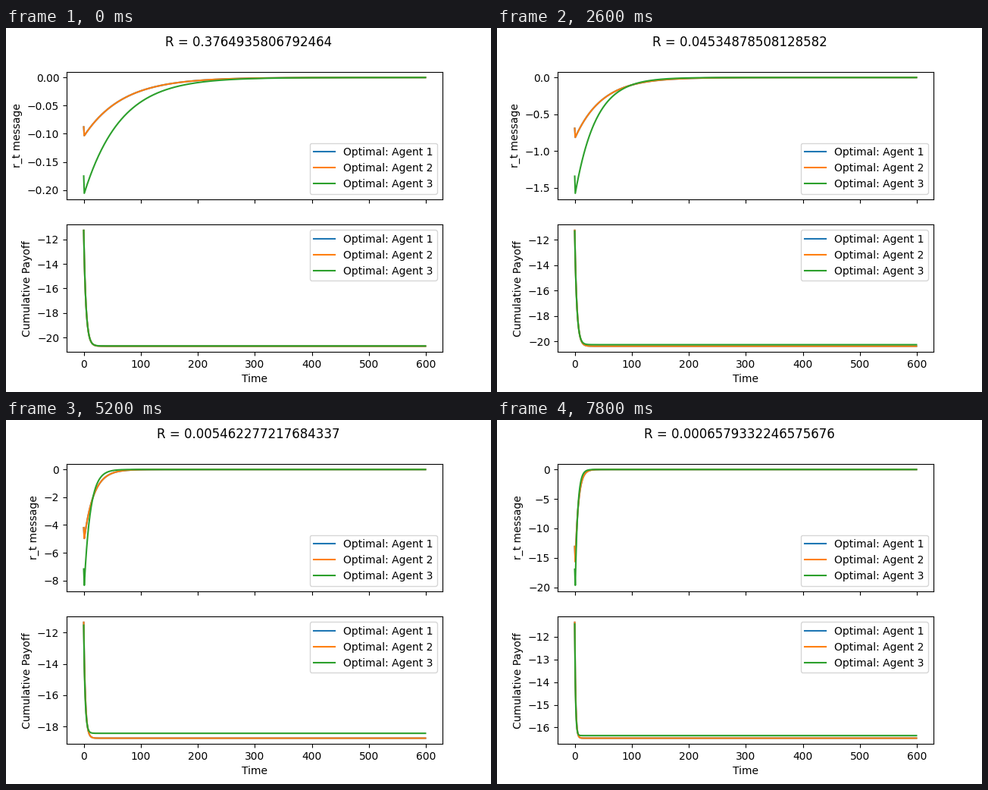
A matplotlib script for the animation above (8 s loop, 640 by 480 pixels).

```python
import numpy as np
import matplotlib.pyplot as plt
from matplotlib.animation import FuncAnimation

FRAMES, STEPS = 40, 600
COSTS = np.logspace(-7, 0, 100)[::-1][6:6 + FRAMES]

DELTA = 0.8        # discount factor
DECAY = 0.9862     # passive decay of the slow mode
PULL = 0.0137      # total influence of a group's messages
SPREAD = 0.0012    # cost of messages disturbing the consensus
START = 11.25      # state cost at time 0
MODE = 1.610       # slow mode after the first mixing step
ALIGN = 0.275      # how far the first message meets the slow mode
REST = 0.215       # leftover disagreement after the first step


def simulate(cost, size):
    """Messages and cumulative payoff of one agent in a group of equals."""
    pull, spread = PULL / size, SPREAD / size**2

    value = 4.5
    for _ in range(200):
        denom = cost + size * DELTA * (pull**2 * value + spread)
        gain = DELTA * DECAY * pull * value / denom
        left = DECAY - size * pull * gain
        value = 1 + cost * gain**2 + DELTA * (
            value * left**2 + spread * (size * gain)**2)

    first = -DELTA * pull * (value - 1 + ALIGN) * MODE / denom
    mode = (MODE + size * pull * first) * left ** np.arange(STEPS - 1)
    msg = np.concatenate([[first], -gain * mode])

    state = np.empty(STEPS)
    state[0] = START
    state[1:] = mode**2 + spread * (size * msg[:-1])**2
    state[1] += REST + 2 * size * first * (ALIGN - 1) * pull * MODE
    payoff = -np.cumsum(DELTA ** np.arange(STEPS) * (state + cost * msg**2))
    return msg, payoff


fig, (top, low) = plt.subplots(2, 1, sharex=True, figsize=(6.4, 4.8), dpi=100)
title = fig.suptitle("")
time = np.arange(STEPS)


def make_lines(ax, ylabel, loc):
    lines = [ax.plot(time, -time, label=f"Optimal: Agent {i}")[0]
             for i in (1, 2, 3)]
    ax.set_ylabel(ylabel)
    ax.legend(loc=loc)
    return lines


messages = make_lines(top, "r_t message", "lower right")
payoffs = make_lines(low, "Cumulative Payoff", "upper right")
low.set_xlabel("Time")


def update(n):
    cost = COSTS[n]
    pair, single = simulate(cost, 2), simulate(cost, 1)
    for i, (msg, payoff) in enumerate((pair, pair, single)):
        messages[i].set_ydata(msg)
        payoffs[i].set_ydata(payoff)
    for ax in (top, low):
        ax.relim()
        ax.autoscale_view()
    title.set_text(f"R = {cost}")
    return messages + payoffs + [title]


anim = FuncAnimation(fig, update, frames=FRAMES, interval=200,
                     repeat=True, repeat_delay=0, blit=False)
plt.show()
```
